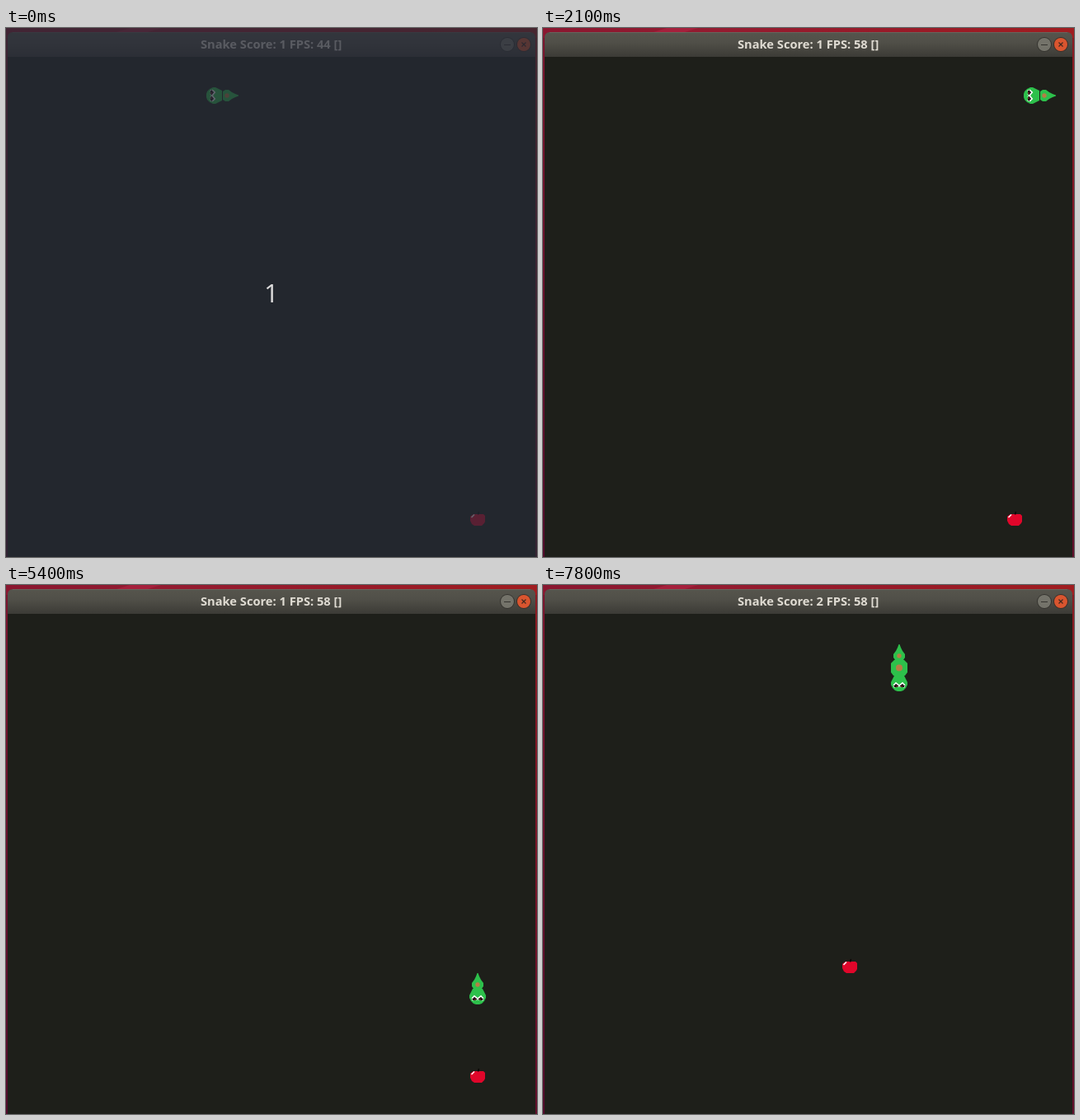
An HTML page with a canvas that plays this animation: 644x642 px, repeating every 8000 ms.

```html
<!DOCTYPE html>
<html lang="en">
<head>
<meta charset="utf-8">
<title>Snake</title>
<style>
  html, body { margin: 0; width: 100%; height: 100%; overflow: hidden; background: #1e1f1a; }
  canvas { display: block; }
</style>
</head>
<body>
<canvas id="stage" width="644" height="642"></canvas>
<script>
const ctx = document.getElementById('stage').getContext('2d');
const W = 644, H = 642, LOOP = 8000, COLS = 32, ROWS = 32;
const GREEN = '#2dc04b', SPOT = '#b57d45';

// Route of the snake: one cell per move, wrapping at the edges.
const route = [];
let col = 14, row = 2;
function go(count, dx, dy) {
  while (count--) {
    col = (col + dx + COLS) % COLS;
    row = (row + dy + ROWS) % ROWS;
    route.push({ col, row, turn: dx ? Math.PI / 2 : 0 });
  }
}
go(18, -1, 0);
go(31, 0, 1);
go(7, -1, 0);
go(3, 0, 1);

// Times of the moves, in tenths of a second.
const moves = [
  1, 3, 3, 5, 7, 8, 9, 11, 12, 14, 15, 17, 18, 19, 21, 22, 24, 25, 27, 29, 29,
  31, 33, 35, 36, 37, 38, 40, 41, 43, 45, 46, 47, 49, 50, 52, 53, 54, 56, 57, 59,
  60, 62, 63, 65, 65, 66, 68, 69, 70, 71, 73, 74, 75, 76, 77, 78
];
const rates = [[0, 44], [900, 56], [1900, 58], [2900, 61], [4000, 57], [5000, 58], [6100, 59], [7000, 58]];
const EATEN = 6200, GROWN = 6300, SCORED = 7000;

function gradient(x1, y1, ...colors) {
  const g = ctx.createLinearGradient(0, 0, x1, y1);
  colors.forEach((c, i) => g.addColorStop(i / (colors.length - 1), c));
  return g;
}

function rect(x, y, w, h, color) {
  ctx.fillStyle = color;
  ctx.fillRect(x, y, w, h);
}

function shape(path, color) {
  ctx.fillStyle = color;
  ctx.fill(new Path2D(path));
}

function line(path, color, width) {
  ctx.strokeStyle = color;
  ctx.lineWidth = width;
  ctx.stroke(new Path2D(path));
}

function disc(x, y, r, color) {
  ctx.fillStyle = color;
  ctx.beginPath();
  ctx.arc(x, y, r, 0, 7);
  ctx.fill();
}

// Parts are drawn in a 20 px cell, facing down.
const parts = {
  head() {
    shape('M4 0H16L18 4L20 8V11L18 15L15 18L12 19H8L5 18L2 15L0 11V8L2 4Z', GREEN);
    shape('M3 12L6.5 9L10 12L13.5 9L17 12V14H13L10 12.5L7 14H3Z', '#17100e');
    line('M3 12L6 8.8L10 12L14 8.8L17 12', '#fff', 1.6);
    line('M3 13L4.5 14.5M8.5 14L10 12.5L11.5 14M17 13L15.5 14.5', '#fff', 1);
    rect(6, 12, 2, 2, '#5c1620');
    rect(12, 12, 2, 2, '#5c1620');
  },
  body() {
    shape('M4 0H16L20 4V15L17 19H3L0 15V4Z', GREEN);
    disc(10, 9.5, 4, SPOT);
  },
  tail() {
    shape('M9.5 0H10.5L12 4L14 8L17 12V16L15 19H5L3 16V12L6 8L8 4Z', GREEN);
    disc(10, 14, 2.7, SPOT);
  }
};

function place(name, cell, turn) {
  ctx.save();
  ctx.translate(12 + cell.col * 20, 44 + cell.row * 19);
  ctx.rotate(turn);
  ctx.translate(-10, -10);
  parts[name]();
  ctx.restore();
}

function drawSnake(t) {
  const head = 1 + moves.filter(m => m * 100 <= t).length;
  const names = t < GROWN ? ['head', 'tail'] : ['head', 'body', 'tail'];
  names.forEach((name, i) => {
    const at = head - i;
    place(name, route[at], route[i ? at + 1 : at].turn);
  });
}

function drawApple(x, y) {
  ctx.save();
  ctx.translate(x, y);
  shape('M5 5H17L19 7V14L18 16L15 19H6L3 17L1 13V8L2 7Z', '#e0062a');
  line('M10.5 5.5L11.5 2', '#080806', 1.5);
  line('M2.5 9L6 5.5', '#fff', 1.6);
  ctx.restore();
}

function drawFrame(t) {
  // Wallpaper showing around the window.
  rect(0, 0, W, 35, gradient(W, 0, '#8a1730', '#941b30', '#981a28', '#a01d20'));
  shape('M150 0H188L172 5H134Z', '#a5203c');
  rect(0, 12, 2, H, gradient(0, H, '#7c142d', '#68102b', '#520b2b'));
  rect(642, 12, 2, H, gradient(0, H, '#8c1a21', '#7a1428', '#600e2a'));

  ctx.fillStyle = gradient(0, 35, '#58574f', '#504f48', '#3c3b36');
  ctx.beginPath();
  ctx.roundRect(2, 5, 640, 30, [6, 6, 0, 0]);
  ctx.fill();
  rect(8, 5, 628, 1, '#66655c');

  ctx.font = '700 14.66px "Open Sans", "Noto Sans", sans-serif';
  ctx.fillStyle = '#dfdbd2';
  const fps = rates.filter(r => r[0] <= t).pop()[1];
  ctx.fillText(`Snake Score: ${t < SCORED ? 1 : 2} FPS: ${fps} []`, 236, 25);

  disc(608, 20, 9, '#35342f');
  disc(608, 20, 8, '#74736a');
  line('M604 20.5H612', '#35342f', 1);
  disc(628, 20, 9, '#3a2f29');
  disc(628, 20, 8, '#d9552f');
  line('M625.5 17.5L630.5 22.5M630.5 17.5L625.5 22.5', '#42291f', 1.2);
}

function draw(t) {
  rect(0, 0, W, H, '#1e1f1a');
  if (t < EATEN) drawApple(562, 585);
  else drawApple(362, 452);
  drawSnake(t);
  drawFrame(t);
  if (t < 100) {
    rect(0, 0, W, H, 'rgba(38, 42, 54, 0.72)');
    ctx.font = '31px "Open Sans", "Noto Sans", sans-serif';
    ctx.fillStyle = '#dcdcdc';
    ctx.fillText('1', 313, 333);
  }
}

function tick(now) {
  draw(now % LOOP);
  requestAnimationFrame(tick);
}
draw(0);
requestAnimationFrame(tick);
</script>
</body>
</html>
```
